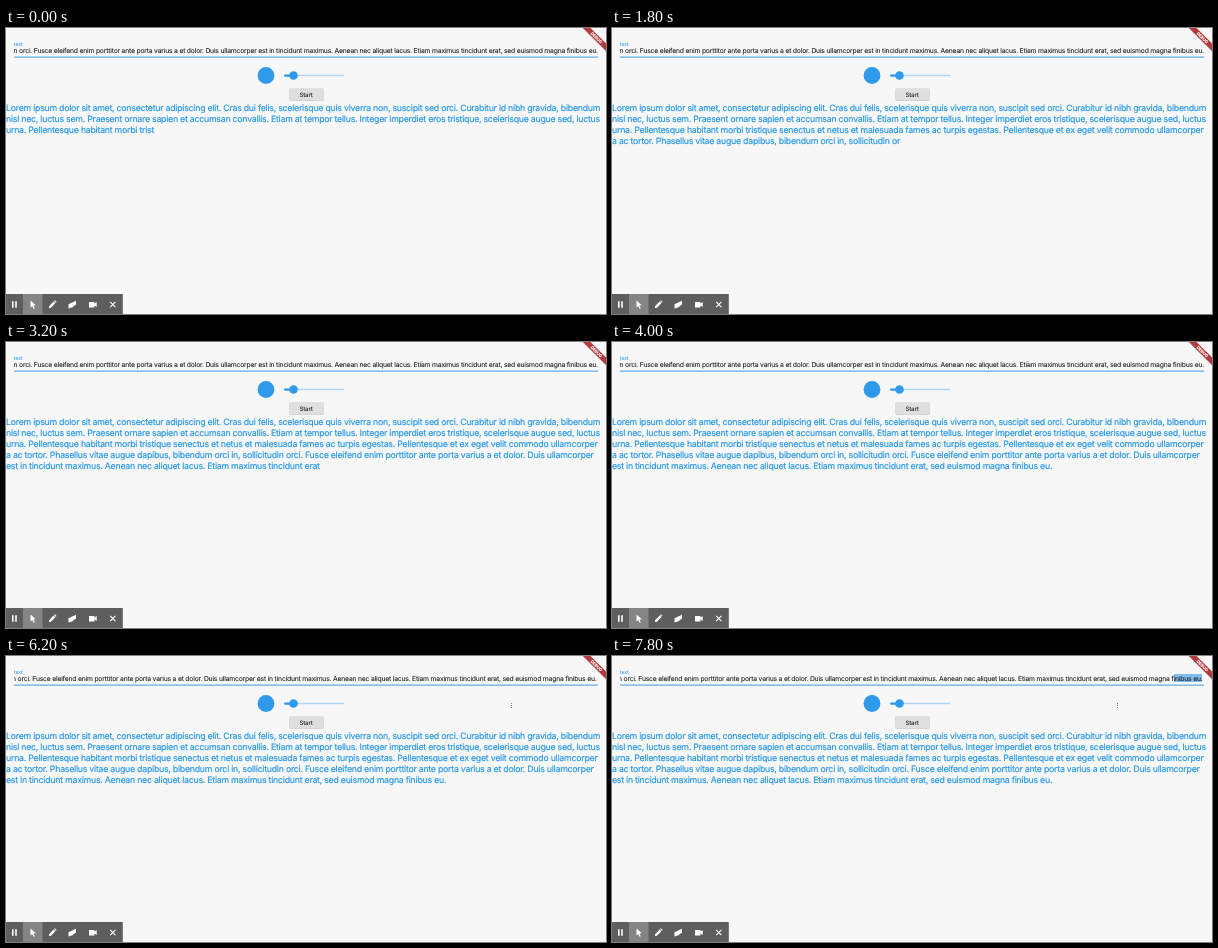
These frames come from a looping animation (600x286 px, 8 s). An HTML page:

```html
<!DOCTYPE html>
<html lang="en">
<head>
<meta charset="utf-8">
<title>Typing text</title>
<style>
  html, body { margin: 0; width: 100%; height: 100%; overflow: hidden; background: #f8f7f8; }
  svg { display: block; width: 100vw; height: 100vh; }
  text {
    font-family: Inter, Roboto, sans-serif; letter-spacing: -.028em;
    text-rendering: geometricPrecision; white-space: pre;
  }
  #lines, #label { fill: #2196e6; }
  #lines { stroke: #2196e6; stroke-width: .14; }
  #field { fill: #1c1c1c; stroke: #1c1c1c; stroke-width: .08; }
  #icons { fill: #fff; }
</style>
</head>
<body>
<svg viewBox="0 0 600 286">
  <defs>
    <clipPath id="fieldClip"><rect x="8" y="14" width="584.5" height="14"/></clipPath>
  </defs>
  <rect width="600" height="286" fill="#f8f7f8"/>

  <!-- text field -->
  <text id="label" x="8" y="17.7" font-size="5.2">text</text>
  <g clip-path="url(#fieldClip)">
    <rect id="selection" y="18" height="8" fill="#7fbdf0"/>
    <text id="field" y="24.6" text-anchor="end"></text>
    <rect id="caret" y="18" width="1" height="8" fill="#3c9ce8"/>
  </g>
  <rect x="8" y="28.6" width="584" height="1" fill="#3c9ce8"/>

  <!-- slider and button -->
  <circle cx="260" cy="47.5" r="8.4" fill="#2f99ea"/>
  <rect x="278" y="46.8" width="60.5" height="1.5" rx=".75" fill="#aed6f5"/>
  <rect x="278" y="46.4" width="10" height="2.3" rx="1.1" fill="#2f99ea"/>
  <circle cx="287.5" cy="47.5" r="4.3" fill="#2f99ea"/>
  <rect x="283.3" y="60.8" width="34.4" height="12" rx="1" fill="#c8c8c8"/>
  <rect x="283.5" y="60.3" width="34" height="11.8" rx="1" fill="#dfdfdf"/>
  <text x="300" y="68.6" font-size="6.1" font-weight="500" text-anchor="middle" fill="#222">Start</text>

  <g id="lines"></g>

  <path id="pointer" d="M0-2.5v1M0-.5v1M0 1.5v1" stroke="#777" stroke-width="1"/>

  <!-- corner banner -->
  <g transform="translate(600 0) rotate(45)">
    <rect x="-24" y="10.6" width="48" height="6.3" fill="#000" opacity=".1"/>
    <rect x="-24" y="11" width="48" height="5.3" fill="#b23a3e"/>
    <text y="15.2" font-size="4.3" font-weight="800" text-anchor="middle" fill="#fff">DEBUG</text>
  </g>

  <!-- recorder toolbar -->
  <rect y="266" width="116.8" height="20" fill="#5e5e5e"/>
  <rect x="17" y="266" width="19.5" height="20" fill="#858585"/>
  <g id="icons">
    <path d="M6 273.3h1.6v6.4H6zM9.2 273.3h1.6v6.4H9.2z"/>
    <path d="M24.5 272.6l5.2 4.6-2.4.3 1.5 2.7-1.2.6-1.4-2.8-1.7 1.5z"/>
    <path d="M43 278.2l4.6-4.6 1.7 1.7-4.6 4.6H43zM48.1 273.1l.8-.8 1.7 1.7-.8.8z"/>
    <path d="M62.5 276.3l7.5-3.6v4l-2.4 1.2-.4 1.2-4.7 1.5z"/>
    <path d="M83 274h5.4v1.6l2.3-1.5v5l-2.3-1.5v1.8H83z"/>
    <path d="M104.2 273.9l5.2 5.2m0-5.2l-5.2 5.2" stroke="#fff" stroke-width="1.1"/>
  </g>
</svg>
<script>
const LOOP = 8000, STEP = 200;
const LINES = [
  'Lorem ipsum dolor sit amet, consectetur adipiscing elit. Cras dui felis, scelerisque quis viverra non, suscipit sed orci. Curabitur id nibh gravida, bibendum',
  'nisl nec, luctus sem. Praesent ornare sapien et accumsan convallis. Etiam at tempor tellus. Integer imperdiet eros tristique, scelerisque augue sed, luctus',
  'urna. Pellentesque habitant morbi tristique senectus et netus et malesuada fames ac turpis egestas. Pellentesque et ex eget velit commodo ullamcorper',
  'a ac tortor. Phasellus vitae augue dapibus, bibendum orci in, sollicitudin orci. Fusce eleifend enim porttitor ante porta varius a et dolor. Duis ullamcorper',
  'est in tincidunt maximus. Aenean nec aliquet lacus. Etiam maximus tincidunt erat, sed euismod magna finibus eu.'
];
const FULL = LINES.join(' ');
const TAIL = FULL.slice(FULL.indexOf('orci. Fusce'));

const $ = id => document.getElementById(id);
const set = (el, attrs) => { for (const k in attrs) el.setAttribute(k, attrs[k]); };
const clamp01 = v => Math.min(1, Math.max(0, v));

// Font size at which a string has the given natural width.
function sizeFor(el, string, width) {
  el.textContent = string;
  set(el, { 'font-size': 100 });
  return 100 * width / el.getComputedTextLength();
}

const field = $('field');
set(field, { 'font-size': sizeFor(field, TAIL, 581) });
field.textContent = 'sollicitudin ' + TAIL;

const rows = LINES.map((_, i) => {
  const row = document.createElementNS('http://www.w3.org/2000/svg', 'text');
  set(row, { x: 0, y: 83.1 + i * 10.86 });
  return $('lines').appendChild(row);
});
const bodySize = sizeFor(rows[0], LINES[0], 595.6);
rows.forEach(row => set(row, { 'font-size': bodySize }));

// Typing progress: [time, characters shown]
const endOf = (start, length) => FULL.indexOf(start) + length;
const TYPING = [
  [0, endOf('tristique senectus', 5)],
  [1200, endOf('ullamcorper a ac', 11)],
  [2400, endOf('ullamcorper est', 8)],
  [3500, FULL.length]
];
function typedAt(t) {
  for (let i = 1; i < TYPING.length; i++) {
    const [t0, n0] = TYPING[i - 1], [t1, n1] = TYPING[i];
    if (t <= t1) return Math.round(n0 + (n1 - n0) * (t - t0) / (t1 - t0));
  }
  return FULL.length;
}

function draw(t) {
  let left = typedAt(t);
  rows.forEach((row, i) => {
    row.textContent = LINES[i].slice(0, Math.max(0, left));
    left -= LINES[i].length + 1;
  });

  const right = t < 4400 ? 592 : 590.5;
  set(field, { x: right });

  const drag = clamp01((t - 7000) / 800);
  const selected = 28 * drag;
  set($('selection'), { x: 590 - selected, width: selected });

  const blink = t % 1000 >= 300 && t % 1000 < 800;
  const caretOn = drag === 0 && (blink || t >= 6900);
  set($('caret'), { x: right - 1, opacity: caretOn ? 1 : 0 });

  const move = clamp01((t - 4000) / 1200);
  const ease = move * move * (3 - 2 * move);
  set($('pointer'), {
    transform: `translate(${416 + 89.5 * ease} ${21.5 + 28 * ease})`,
    opacity: t >= 2000 ? 1 : 0
  });
}

const start = performance.now();
function tick() {
  const t = (performance.now() - start) % LOOP;
  draw(Math.floor(t / STEP) * STEP);
  requestAnimationFrame(tick);
}
tick();
</script>
</body>
</html>
```
